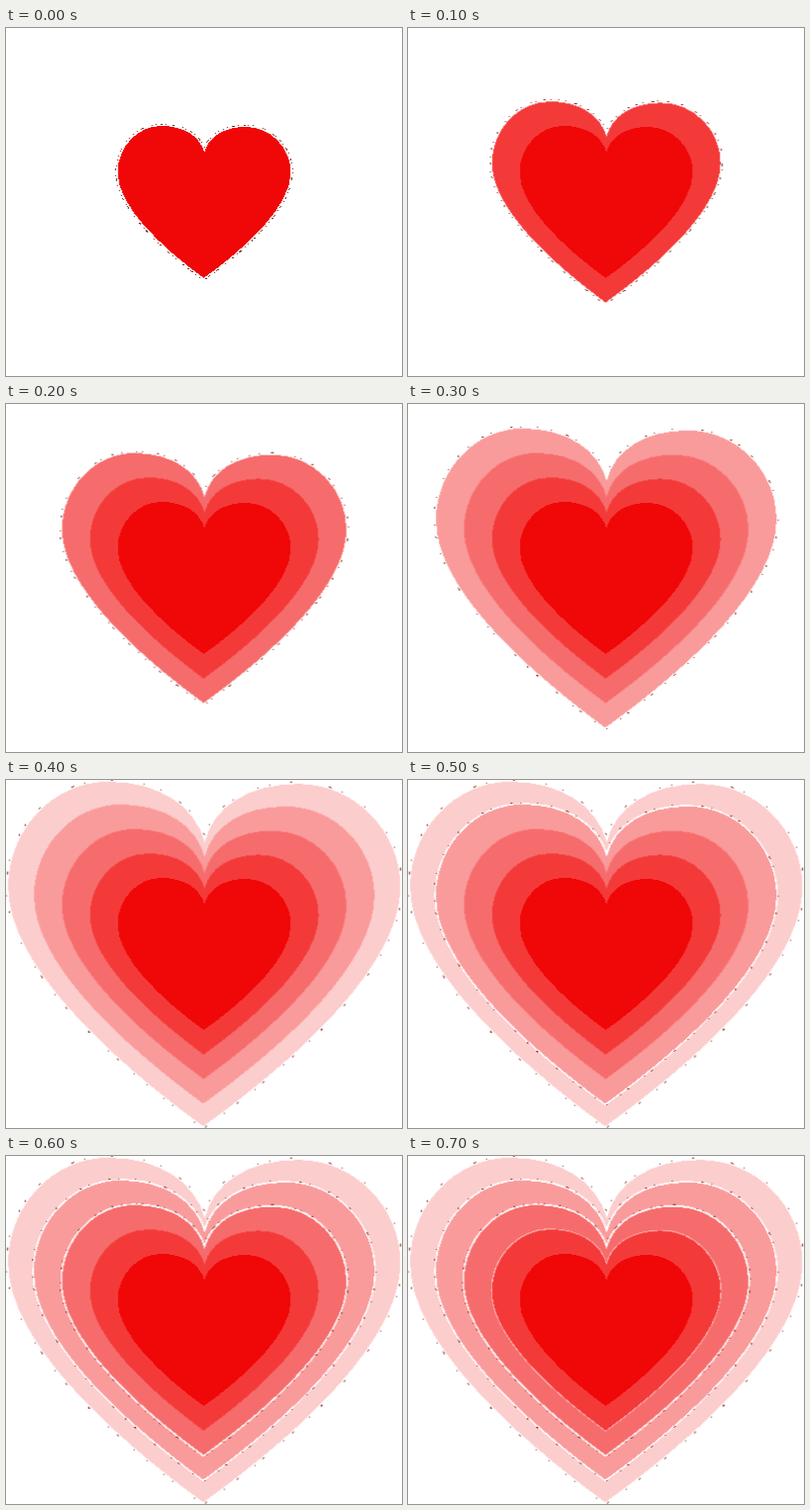
An HTML page for the animation above (800 ms loop, 400 by 352 pixels).

```html
<!DOCTYPE html>
<html lang="en">
<head>
<meta charset="utf-8">
<title>Pulsing heart</title>
<style>
html, body { margin: 0; width: 100%; height: 100%; overflow: hidden; background: #fff; }
svg { display: block; width: 100%; height: 100%; }
path { vector-effect: non-scaling-stroke; shape-rendering: crispEdges; }
</style>
</head>
<body>
<svg id="stage" viewBox="0 0 400 352"></svg>
<script>
const STEPS = 8, STEP_MS = 100;
const HEART = 'M.2-50C4-66 20-76 42-76C67-76 87.5-55 87.5-30C87.5 4 44 45-.5 77' +
  'C-44 45-87.5 4-87.5-30C-87.5-55-68-77-43-77C-20-77-4-66 .2-50Z';

// Smallest first: scale, colour, steps at which the rim shows.
const layers = [
  { scale: 1,     color: '#f00707', rim: [0] },
  { scale: 1.32,  color: '#f43939', rim: [1], thin: [7] },
  { scale: 1.642, color: '#f66c6c', rim: [2, 6, 7] },
  { scale: 1.965, color: '#fa9b9b', rim: [3, 5, 6, 7] },
  { scale: 2.264, color: '#fccdcd', rim: [4, 5, 6, 7] }
];

function add(parent, name, attrs) {
  const el = document.createElementNS('http://www.w3.org/2000/svg', name);
  for (const key in attrs) el.setAttribute(key, attrs[key]);
  return parent.appendChild(el);
}

function showAt(el, visible) {
  const frames = [];
  for (let i = 0; i <= STEPS; i++) {
    frames.push({
      offset: i / STEPS,
      opacity: visible(i % STEPS) ? 1 : 0,
      easing: 'steps(1, end)'
    });
  }
  el.animate(frames, { duration: STEPS * STEP_MS, iterations: Infinity });
}

function outline(parent, color, width, extra) {
  return add(parent, 'path', {
    d: HEART, fill: 'none', stroke: color, 'stroke-width': width, ...extra
  });
}

// Specks along the rim grow sparser on larger hearts.
function specks(scale) {
  return [2, 3, 1, 4, 3, 2, 1, 5, 2, 2, 1, 4]
    .map((n, i) => i % 2 ? n * scale ** 2 : n).join(' ');
}

const stage = document.getElementById('stage');
for (let i = layers.length - 1; i >= 0; i--) {
  const { scale, color, rim, thin } = layers[i];
  const heart = add(stage, 'g', { transform: `translate(200.2 176) scale(${scale})` });

  const edge = add(heart, 'g');
  outline(edge, '#fff', 3);
  outline(edge, '#701818', 4.4, { 'stroke-dasharray': specks(scale) });
  outline(edge, '#fff', 2.8);
  showAt(edge, n => rim.includes(n));

  if (thin) {
    showAt(outline(heart, '#fff', 1.6, { 'stroke-opacity': 0.6 }), n => thin.includes(n));
  }

  add(heart, 'path', { d: HEART, fill: color });
  showAt(heart, n => n >= i);
}
</script>
</body>
</html>
```
